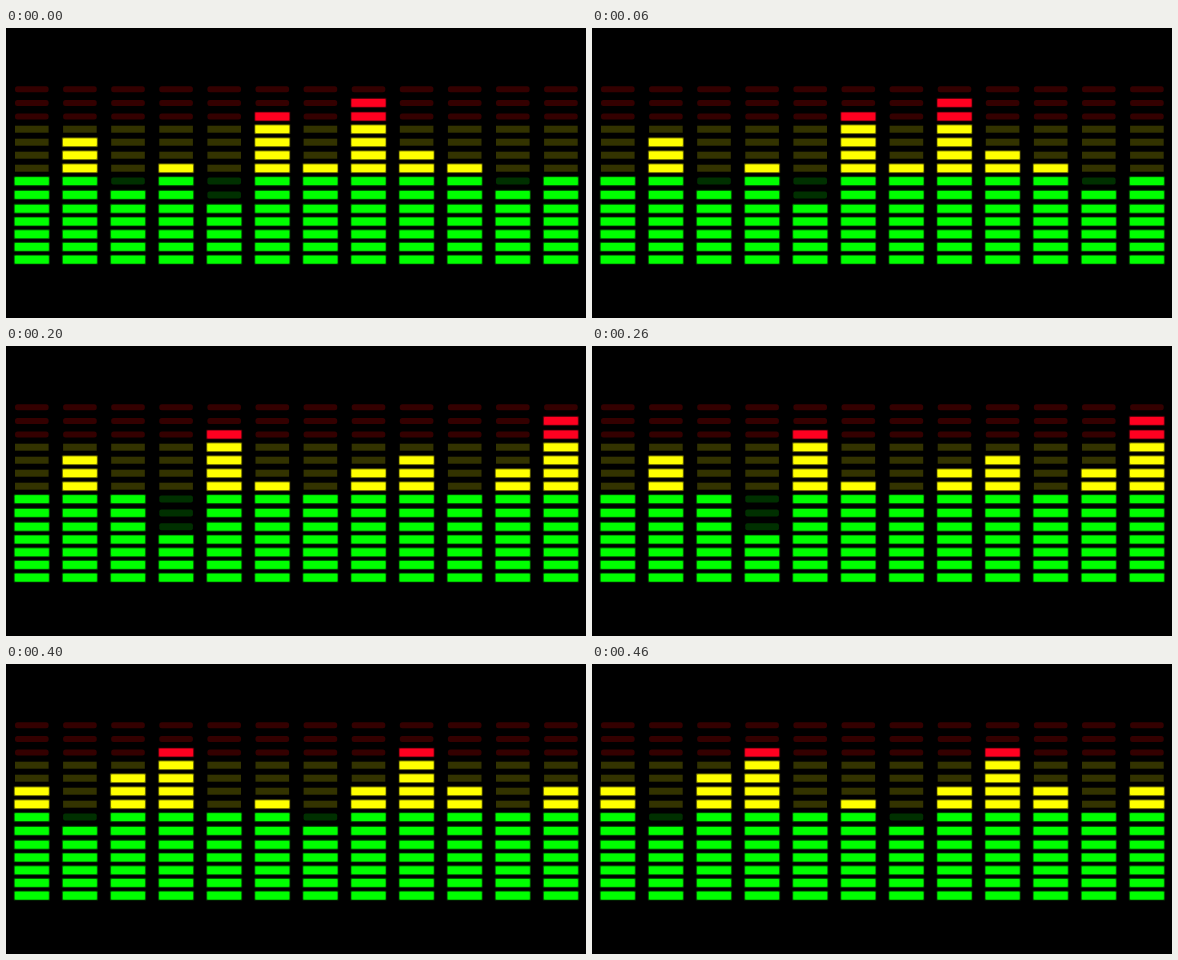
Animation, 580 px wide and 290 px high, one loop 500 ms. Source, as an HTML page:

```html
<!DOCTYPE html>
<html lang="en">
<head>
<meta charset="utf-8">
<title>Equalizer</title>
<style>
  html, body { margin: 0; width: 100%; height: 100%; overflow: hidden; background: #000; }
  svg { display: block; width: 580px; height: 290px; }
</style>
</head>
<body>
<svg id="stage" viewBox="0 0 580 290" xmlns="http://www.w3.org/2000/svg"></svg>
<script>
const STEP = 100;
const LEFT = 25.8;
const PITCH = 48.1;

const green = { on: '#00ff00', off: '#003000', h: 7, r: 2 };
const yellow = { on: '#ffff00', off: '#333300', h: 7, r: 0 };
const red = { on: '#ff0020', off: '#340000', h: 6, r: 2.5 };

// Bands from the bottom up: first row centre, row gap, row count
const bands = [
  { tone: green, y: 231.6, gap: 12.7, count: 4 },
  { tone: green, y: 180.7, gap: 13.8, count: 3 },
  { tone: yellow, y: 140.2, gap: 13, count: 4 },
  { tone: red, y: 88.5, gap: 13.6, count: 3 }
];
const rows = bands.flatMap(({ tone, y, gap, count }) =>
  Array.from({ length: count }, (_, i) => ({ tone, y: y - i * gap })));

// Bar heights at each beat
const swing = [9, 6, 10, 12, 7, 8, 6, 9, 12, 9, 7, 9];
const beats = [
  [7, 10, 6, 8, 5, 12, 8, 13, 9, 8, 6, 7],
  swing,
  [7, 10, 7, 4, 12, 8, 7, 9, 10, 7, 9, 13],
  [4, 7, 12, 9, 10, 5, 11, 5, 13, 10, 7, 9],
  swing
];

const stage = document.getElementById('stage');

function add(parent, name, attrs = {}) {
  const el = document.createElementNS(stage.namespaceURI, name);
  for (const key in attrs) el.setAttribute(key, attrs[key]);
  return parent.appendChild(el);
}

function block(parent, cx, cy, width, height, fill, rx, opacity = 1) {
  add(parent, 'rect', { x: cx - width / 2, y: cy - height / 2, width, height, rx, fill, opacity });
}

function segment(x, { tone, y }) {
  const off = add(stage, 'g');
  const on = add(stage, 'g');
  block(off, x, y, 33.6, tone.h, tone.off, tone.r);
  // Soft edge around a solid core
  for (let i = 0; i < 3; i++) {
    block(on, x, y, 36.4 - i * 1.3, 10.2 - i * 1.3, tone.on, 1, [0.15, 0.5, 1][i]);
  }
  return { off, on };
}

const bars = swing.map((_, col) => rows.map(row => segment(LEFT + col * PITCH, row)));

function draw(time) {
  const levels = beats[Math.floor(time / STEP) % beats.length];
  bars.forEach((bar, col) => bar.forEach(({ off, on }, row) => {
    const lit = row < levels[col];
    off.style.display = lit ? 'none' : '';
    on.style.display = lit ? '' : 'none';
  }));
}

const start = performance.now();
function tick() {
  draw(performance.now() - start);
  requestAnimationFrame(tick);
}
tick();
</script>
</body>
</html>
```
